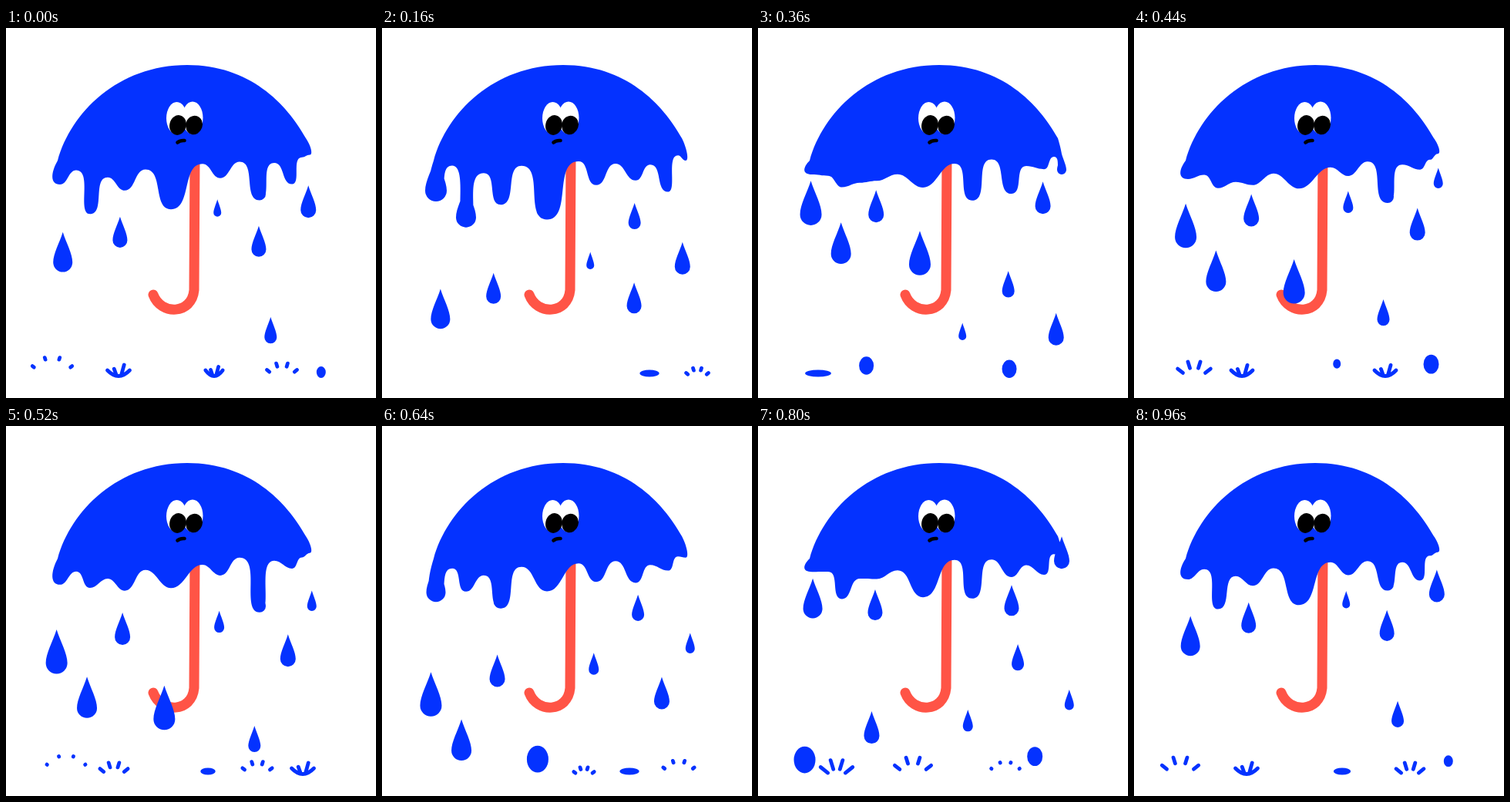
Animation of 480x480 px, one loop 1 s. Source, as an HTML page:

```html
<!DOCTYPE html>
<html lang="en">
<head>
<meta charset="utf-8">
<title>Melting umbrella</title>
<style>
html, body { margin: 0; width: 100%; height: 100%; overflow: hidden; background: #fff; }
svg { display: block; width: 100vw; height: 100vh; }
</style>
</head>
<body>
<svg viewBox="0 0 480 480">
  <path d="M245 166L244 340C241 372 201 373 191 346" fill="none" stroke="#ff5446" stroke-width="13" stroke-linecap="round"/>
  <path id="water" fill="#0432ff"/>
  <path id="spray" fill="none" stroke="#0432ff" stroke-linecap="round" stroke-width="4.8"/>
  <g fill="#fff">
    <ellipse cx="221.5" cy="117" rx="13.5" ry="21"/>
    <ellipse cx="242" cy="116.5" rx="13.5" ry="21"/>
  </g>
  <g fill="#000">
    <ellipse cx="223" cy="126" rx="10.8" ry="13" transform="rotate(14 223 126)"/>
    <ellipse cx="244" cy="126" rx="10.8" ry="12.3" transform="rotate(18 244 126)"/>
  </g>
  <path d="M222.500 148.500Q226 145.500 231.500 146" fill="none" stroke="#000" stroke-width="4.6" stroke-linecap="round"/>
</svg>
<script>
const LOOP = 1000, STEP = 40;
const GROUND = 454, SPEED = .46;
const BULB_TIME = 130;   // a drop rides the end of its drip this long before it lets go
const SPLASH_STAGE = 46;

// A drip swells from rest by reach, then sheds a drop, again and again.
const drip = (x, rest, reach, ...drops) => ({ x, rest, reach, drops });
const drop = (shed, linger, width, drift) => ({ shed, linger, width, drift });
const drips = [
  drip(70, 188, 60, drop(280, 80, 28, -10), drop(720, 131, 25, 8)),
  drip(109, 206, 68, drop(280, 12, 26, -7)),
  drip(154, 197, 55, drop(300, 152, 20, -8), drop(700, 230, 19, -14)),
  drip(214, 206, 48, drop(220, -5, 28, -13)),
  drip(278, 192, 41, drop(430, 15, 13, -8), drop(850, 136, 10, -16)),
  drip(329, 196, 50, drop(70, 65, 16, -8), drop(540, 105, 16, 18), drop(800, 90, 19, -3)),
  drip(371, 183, 40, drop(300, 26, 20, -13)),
  drip(394, 163, 33, drop(410, 15, 12, 15), drop(885, 6, 20, -9))
];
const arches = [[91, 192], [132, 201], [181, 190], [255, 181], [303, 178], [348, 182], [384, 171]];

const mod = t => (t % LOOP + LOOP) % LOOP;
const clamp = (v, lo, hi) => Math.max(lo, Math.min(hi, v));

function stretch({ reach, drops }, t) {
  const ages = drops.map(d => mod(t - d.shed));
  const since = Math.min(...ages), left = LOOP - Math.max(...ages);
  return reach * (since / (since + left)) ** 2;
}

// S-curve between a drip end and an arch; steep ones pinch into a neck.
function wave(x, y, u, v) {
  const dx = u - x, steep = .2 + .33 * Math.abs((v - y) / dx);
  const end = clamp(steep, .4, .95), arch = clamp(steep, .4, 1.2);
  const [a, b] = y > v ? [end, arch] : [arch, end];
  return `C${x + a * dx} ${y} ${u - b * dx} ${v} ${u} ${v}`;
}

function canopy(t) {
  const grown = drips.map(d => stretch(d, t));
  const points = [];
  drips.forEach((d, i) => {
    points.push([d.x, d.rest + grown[i]]);
    if (arches[i]) {
      const [x, y] = arches[i];
      points.push([x, y - .15 * (grown[i] + grown[i + 1])]);
    }
  });
  let [x, y] = points.pop();
  let path = `M67 172C84 110 145 48 235 48C316 48 364 98 389 143` +
    `C${x + 1} ${143 + (y - 143) * .4} ${x + 5} ${y} ${x} ${y}`;
  for (const [u, v] of points.reverse()) {
    path += wave(x, y, u, v);
    [x, y] = [u, v];
  }
  return path + `C${x - 13} ${y} ${x - 12} ${(y + 172) / 2} 67 172Z`;
}

function oval(x, y, rx, ry) {
  return `M${x - rx} ${y}a${rx} ${ry} 0 1 1 ${2 * rx} 0a${rx} ${ry} 0 1 1 ${-2 * rx} 0Z`;
}

function teardrop(x, bottom, w) {
  const r = w / 2;
  if (bottom > 438) return oval(x, bottom - w * .62, r, w * .62);
  const h = 1.95 * w + 3, top = bottom - h, c = bottom - r;
  const y1 = top + h * .28, y2 = c - r * .9, lean = w * .18;
  return `M${x} ${top}C${x + lean} ${y1} ${x + r} ${y2} ${x + r} ${c}` +
    `A${r} ${r} 0 0 1 ${x - r} ${c}C${x - r} ${y2} ${x - lean} ${y1} ${x} ${top}Z`;
}

// Flat puddle, then a crown, then flying streaks that shrink to dots.
function splash(x, w, age, out) {
  const k = age / SPLASH_STAGE, y = GROUND - 1, r = w / 2;
  if (k < 1) {
    out.water += oval(x, y - 5, r, 4.5);
  } else if (k < 2) {
    out.spray += `M${x - r} ${y - 9}Q${x} ${y + 6} ${x + r} ${y - 9}`;
    for (const s of [-.2, .25])
      out.spray += `M${x + s * r} ${y - 3}L${x + s * w} ${y - 5 - w * (.28 + s * .4)}`;
  } else if (k < 4.5) {
    const far = w * (.6 + .08 * k), near = Math.min(far - .5, w * (.4 + .25 * (k - 2)));
    for (const angle of [-.9, -.3, .3, .9]) {
      const sx = Math.sin(angle), sy = Math.cos(angle);
      out.spray += `M${x + sx * near} ${y + 6 - sy * near}L${x + sx * far} ${y + 6 - sy * far}`;
    }
  }
}

function shed(source, { shed, linger, width, drift }, t, out) {
  const age = mod(t - shed + BULB_TIME) - BULB_TIME;
  if (age < 0) {
    out.water += teardrop(source.x, source.rest + stretch(source, t), width);
    return;
  }
  const start = source.rest + source.reach;
  const landing = linger + (GROUND + 10 - start) / SPEED;
  if (age > landing) {
    splash(source.x + drift, 10 + .95 * width, age - landing, out);
    return;
  }
  const ease = 25, falling = ease * Math.log1p(Math.exp((age - linger) / ease));
  const bottom = Math.min(GROUND, start + SPEED * falling);
  out.water += teardrop(source.x + drift * age / landing, bottom, width);
}

const water = document.getElementById('water');
const spray = document.getElementById('spray');

function draw(t) {
  const out = { water: canopy(t), spray: '' };
  for (const d of drips)
    for (const one of d.drops) shed(d, one, t, out);
  water.setAttribute('d', out.water);
  spray.setAttribute('d', out.spray);
}

let begin;
function tick(now) {
  begin ??= now;
  draw(Math.floor((now - begin) % LOOP / STEP) * STEP);
  requestAnimationFrame(tick);
}
draw(0);
requestAnimationFrame(tick);
</script>
</body>
</html>
```
